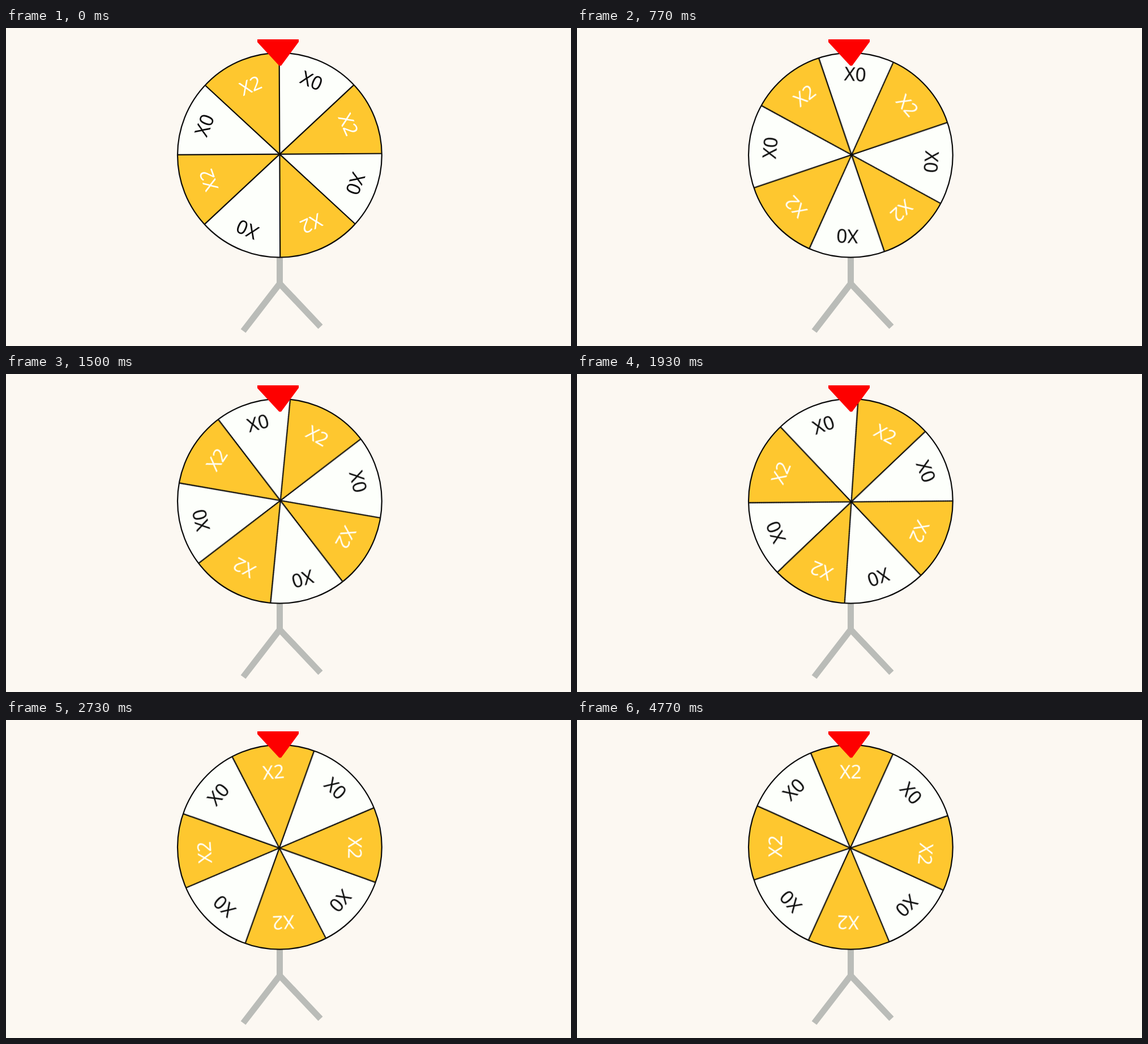
Recreate the animation shown at these times as an HTML page. Size 998 px wide and 561 px high, loop 4860 ms.

```html
<!DOCTYPE html>
<html lang="en">
<head>
<meta charset="utf-8">
<title>Prize wheel</title>
<style>
  html, body { margin: 0; width: 100%; height: 100%; overflow: hidden; background: #fcf8f2; }
  svg { display: block; width: 998px; height: 561px; }
  text { font: 33.5px "Noto Sans", "Open Sans", sans-serif; text-anchor: middle; }
  #wheel { transform-origin: 0 0; }
</style>
</head>
<body>
<svg viewBox="0 0 998 561">
  <g fill="none" stroke="#babcb8" stroke-width="11">
    <path d="M483.5 400V452"/>
    <path d="M419 534.5L483.5 451L555.5 527"/>
  </g>
  <g transform="translate(483.4 224.3)">
    <circle r="180.4" fill="#fdfffb"/>
    <g id="wheel"></g>
    <circle r="180.4" fill="none" stroke="#0b0b0b" stroke-width="2.2"/>
  </g>
  <path d="M444 20H517V24.5L486 66.5H482.5L444 25Z" fill="#fe0000"/>
</svg>
<script>
const LOOP = 4860, FPS = 30, SPIN = 3067, TURN = 924.7;
const R = 180.4, HUB_Y = -1.7;
const wheel = document.getElementById('wheel');

// Four hand-drawn diameters, in degrees clockwise from the top
const diameters = [-0.25, 47, 89.65, 132.7];
const spokes = [...diameters, ...diameters.map(a => a + 180), 359.75];

const rad = deg => deg * Math.PI / 180;
const polar = (deg, r) => [r * Math.sin(rad(deg)), -r * Math.cos(rad(deg))];

// Direction from the centre after a point is nudged upwards
const skew = (deg, amount) => deg - amount * Math.sin(rad(deg));

function add(tag, attrs, text = '') {
  const el = document.createElementNS('http://www.w3.org/2000/svg', tag);
  for (const key in attrs) el.setAttribute(key, attrs[key]);
  el.textContent = text;
  wheel.append(el);
}

function build() {
  const rim = spokes.map(a => polar(skew(a, 0.54), R));
  for (let i = 1; i < 8; i += 2) {
    add('path', { d: `M0 ${HUB_Y}L${rim[i]}A${R} ${R} 0 0 1 ${rim[i + 1]}Z`, fill: '#fec72f' });
  }
  for (let i = 0; i < 4; i++) {
    add('path', { d: `M${rim[i]}L0 ${HUB_Y}L${rim[i + 4]}`, fill: 'none', stroke: '#0b0b0b', 'stroke-width': 2.2 });
  }
  for (let i = 0; i < 8; i++) {
    const win = i % 2 === 1;
    const angle = skew((spokes[i] + spokes[i + 1]) / 2, win ? 2.5 : 0.5);
    add('text', {
      transform: `translate(${polar(angle, win ? 133 : 143)}) rotate(${angle})`,
      dy: '0.357em',
      fill: win ? '#fffffa' : '#0b0b0b'
    }, win ? 'X2' : 'X0');
  }
}

build();

const end = `rotate(${TURN}deg)`;
const spin = wheel.animate([
  { transform: 'rotate(0deg)', easing: 'cubic-bezier(0.279, 0, 0.089, 1)' },
  { transform: end, offset: SPIN / LOOP },
  { transform: end }
], { duration: LOOP, iterations: Infinity });
spin.pause();

// Step the spin at a film-like frame rate
function draw() {
  const frame = Math.floor((performance.now() % LOOP) * FPS / 1000 + 0.12);
  spin.currentTime = frame * 1000 / FPS;
  requestAnimationFrame(draw);
}
draw();
</script>
</body>
</html>
```
